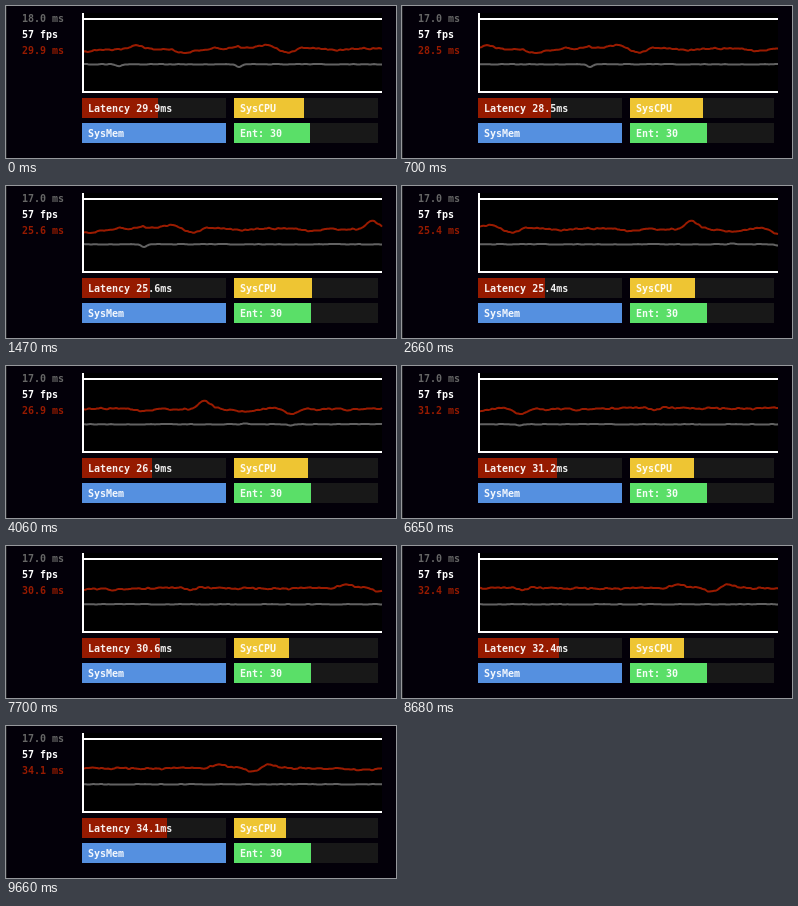
These frames come from a looping animation (390 px wide and 152 px high, 9.73 s). An HTML page:

```html
<!DOCTYPE html>
<html lang="en">
<head>
<meta charset="utf-8">
<title>Performance monitor</title>
<style>
  html, body { margin: 0; width: 100%; height: 100%; overflow: hidden; background: #030009; }
  svg { display: block; width: 390px; height: 152px; }
  text { font: bold 10px "DejaVu Sans Mono", "Liberation Mono", monospace; fill: #fff; white-space: pre; }
  path { fill: none; stroke-width: 2; stroke-linejoin: round; }
  .track { fill: #181818; }
  .label text { fill-opacity: 0.93; }
</style>
</head>
<body>
<svg viewBox="0 0 390 152">
  <rect width="1" height="152" fill="#202024"/>
  <text id="frameMs" x="16" y="16" style="fill:#666"></text>
  <text x="16" y="32">57 fps</text>
  <text id="latency" x="16" y="48" style="fill:#961a00"></text>

  <rect x="76" y="7" width="300" height="80" fill="#000"/>
  <path id="grey" stroke="#626262"/>
  <path id="red" stroke="#9a1b00"/>
  <g fill="#fff">
    <rect x="76" y="7" width="2" height="80"/>
    <rect x="76" y="12" width="300" height="2"/>
    <rect x="76" y="85" width="300" height="2"/>
  </g>

  <rect class="track" x="76" y="92" width="144" height="20"/>
  <rect class="track" x="228" y="92" width="144" height="20"/>
  <rect class="track" x="228" y="117" width="144" height="20"/>
  <rect id="latBar" x="76" y="92" height="20" fill="#961a00"/>
  <rect id="cpuBar" x="228" y="92" height="20" fill="#eec533"/>
  <rect x="76" y="117" width="144" height="20" fill="#5590e0"/>
  <rect id="entBar" x="228" y="117" height="20" fill="#5adf68"/>
  <g class="label">
    <text id="latLabel" x="82" y="106"></text>
    <text x="234" y="106">SysCPU</text>
    <text x="82" y="131">SysMem</text>
    <text x="234" y="131">Ent: 30</text>
  </g>
</svg>
<script>
const LOOP = 9730, STEP = 70, REFRESH = 490, SPEED = 0.0647;
const LEFT = 78, RIGHT = 376;
const STALLS = [[2660, 3570], [4130, 5040]];

// main swells of the latency curve: position, height, half width
const SWELLS = [
  [78, 4, 12], [130, -3, 18], [180, 3, 12], [230, -2.5, 14], [258, -3, 12], [281, 4, 10],
  [460, -8, 9], [506, 3, 10], [549, 6, 10], [840, -4, 14], [870, 4, 8], [887, -5, 9]
];
const SMALL_DIPS = [[113, 2], [233, 2.4], [547, 0.9], [503, -1]];

// refresh number, latency, cpu bar width
const KEYS = [
  [0, 29.9, 70], [3, 25.6, 78], [5, 25.4, 65], [11, 28.5, 82],
  [13, 31.2, 64], [15, 30.6, 55], [19, 34.1, 52]
];

const $ = id => document.getElementById(id);
const mix = (a, b, p) => a + (b - a) * p;

function random(n) {
  const v = Math.sin(n * 12.9898) * 43758.5453;
  return v - Math.floor(v) - 0.5;
}

function ripple(u, size) {
  const i = Math.floor(u / size), p = u / size - i;
  return mix(random(i), random(i + 1), p * p * (3 - 2 * p));
}

function redY(u) {
  let y = 43 + ripple(u, 11) * 3.2 + ripple(u + 5000, 3) * 1.5;
  for (const [at, h, w] of SWELLS) y += h * Math.exp(-(((u - at) / w) ** 2));
  return y;
}

function greyY(u) {
  let y = 58.3 + ripple(u + 9000, 4) * 0.6;
  for (const [at, h] of SMALL_DIPS) y += h * Math.exp(-(((u - at) / 4) ** 2));
  return y;
}

function trace(id, fn, shift) {
  const points = [];
  for (let x = LEFT; x <= RIGHT; x++) points.push(x + " " + fn(x + shift).toFixed(1));
  $(id).setAttribute("d", "M" + points.join("L"));
}

function reading(n) {
  const i = Math.max(1, KEYS.findIndex(k => k[0] >= n));
  const a = KEYS[i - 1], b = KEYS[i], p = (n - a[0]) / (b[0] - a[0]);
  return [mix(a[1], b[1], p), Math.round(mix(a[2], b[2], p))];
}

function draw(ms) {
  let t = Math.floor((ms % LOOP) / STEP) * STEP;
  for (const [from, to] of STALLS) if (t > from && t < to) t = from;

  const shift = Math.round(t * SPEED);
  trace("red", redY, shift);
  trace("grey", greyY, shift);

  const n = Math.floor(t / REFRESH);
  const [lat, cpu] = reading(n);
  $("frameMs").textContent = (n * 5 % 11 < 3 ? 18 : 17) + ".0 ms";
  $("latency").textContent = lat.toFixed(1) + " ms";
  $("latLabel").textContent = "Latency " + lat.toFixed(1) + "ms";
  $("latBar").setAttribute("width", Math.floor(2 * lat + 17));
  $("cpuBar").setAttribute("width", cpu);
  $("entBar").setAttribute("width", n ? 77 : 76);
}

const start = performance.now();
function tick() {
  draw(performance.now() - start);
  requestAnimationFrame(tick);
}
tick();
</script>
</body>
</html>
```
